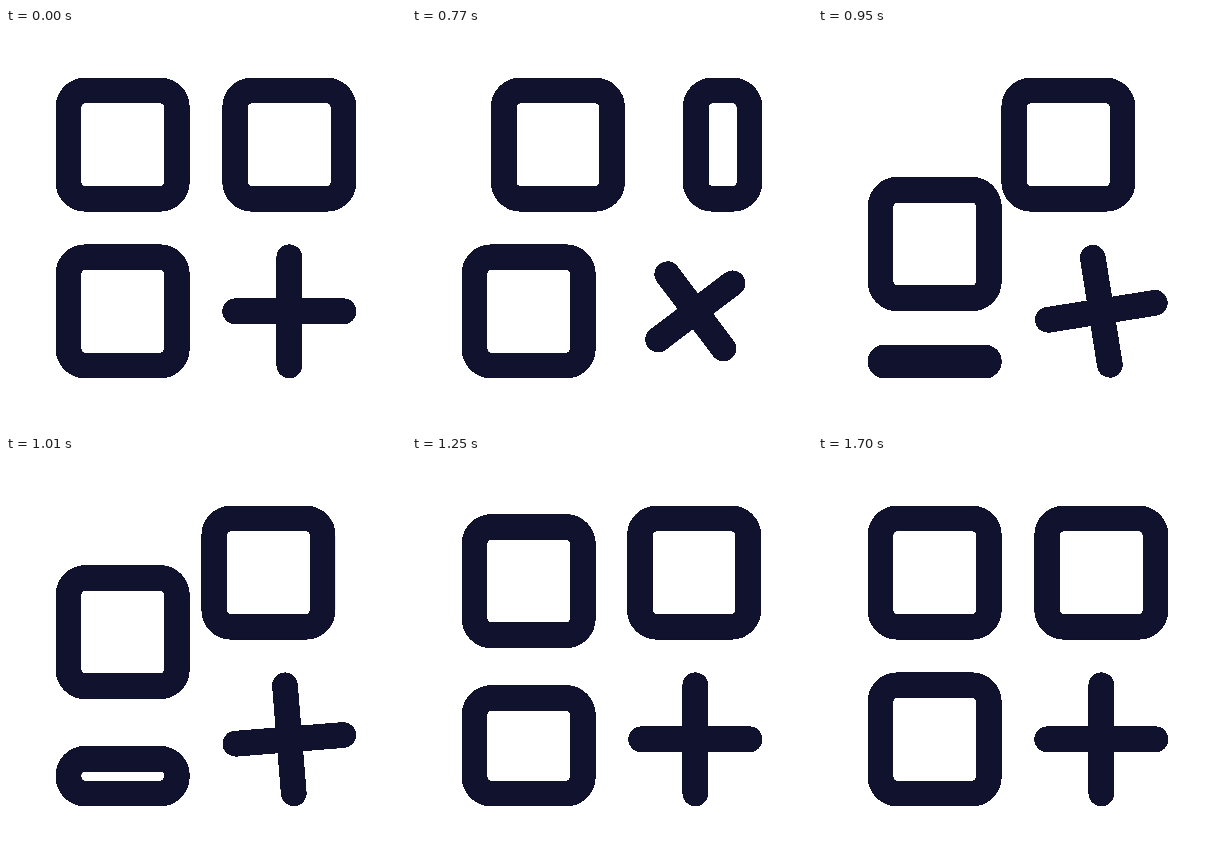
Write an HTML page with a canvas that moves like this. It is 400x400 px and loops after 1730 ms.

```html
<!DOCTYPE html>
<html lang="en">
<head>
<meta charset="utf-8">
<title>Shifting tiles</title>
<style>
html, body { margin: 0; width: 100%; height: 100%; overflow: hidden; background: #fff; }
canvas { display: block; filter: url(#crisp); }
svg { position: absolute; }
</style>
</head>
<body>
<!-- Every pixel a shape touches becomes solid, giving hard edges. -->
<svg width="0" height="0">
  <filter id="crisp" x="0" y="0" width="1" height="1" color-interpolation-filters="sRGB">
    <feComponentTransfer><feFuncA type="linear" slope="20" intercept="-2"/></feComponentTransfer>
  </filter>
</svg>
<canvas id="stage" width="400" height="400"></canvas>
<script>
const LOOP = 1730, STEP = 30, PHASE = 20;
const UNIT = 50 / 3;           // the icon sits on a 24-unit grid
const SIDE = 6.5 * UNIT, NEAR = 3.75 * UNIT, SHIFT = 10 * UNIT, FAR = NEAR + SHIFT;
const ctx = document.getElementById('stage').getContext('2d');

// Eased progress from start over span, along cubic-bezier(x1, 0, x2, 1).
function ease(t, start, span, x1, x2) {
  const x = Math.min(1, Math.max(0, (t - start) / span));
  if (x === 0 || x === 1) return x;
  let lo = 0, hi = 1;
  for (let i = 0; i < 30; i++) {
    const s = (lo + hi) / 2, r = 1 - s;
    if (3 * s * r * r * x1 + 3 * s * s * r * x2 + s ** 3 < x) lo = s;
    else hi = s;
  }
  return lo * lo * (3 - 2 * lo);
}

function tile(x, y, w = SIDE, h = SIDE) {
  ctx.beginPath();
  ctx.roundRect(x, y, w, h, Math.min(UNIT, w / 2, h / 2));
  ctx.stroke();
}

function plus(angle, arm) {
  ctx.save();
  ctx.translate(17 * UNIT, 17 * UNIT);
  ctx.rotate(angle);
  ctx.beginPath();
  ctx.moveTo(-arm, 0);
  ctx.lineTo(arm, 0);
  ctx.moveTo(0, -arm);
  ctx.lineTo(0, arm);
  ctx.stroke();
  ctx.restore();
}

function draw(t) {
  ctx.clearRect(0, 0, 400, 400);
  ctx.strokeStyle = '#11122e';
  ctx.lineWidth = 1.5 * UNIT;
  ctx.lineCap = ctx.lineJoin = 'round';

  // Right tile is squeezed away, the others move round, a new one grows.
  tile(NEAR + SHIFT * ease(t, 658, 690, 1 / 3, 0), NEAR);
  tile(NEAR, FAR - SHIFT * ease(t, 799, 682, 1 / 3, 0));
  if (t < 850) {
    const cut = SIDE * ease(t, 620, 230, 0.5, 0.9);
    tile(FAR + cut, NEAR, SIDE - cut);
  }
  if (t > 865) {
    const tall = SIDE * ease(t, 860, 748, 1 / 3, 0);
    tile(NEAR, FAR + SIDE - tall, SIDE, tall);
  }

  const dip = ease(t, 510, 180, 1 / 3, 0.467) - ease(t, 690, 180, 1 / 3, 0.467);
  plus(Math.PI / 2 * ease(t, 510, 676, 0.296, 0.274), SIDE / 2 * (1 - 0.3 * dip));
}

const begin = performance.now();
function frame() {
  const t = (performance.now() - begin) % LOOP;
  draw(Math.floor((t - PHASE) / STEP) * STEP + PHASE);
  requestAnimationFrame(frame);
}
frame();
</script>
</body>
</html>
```
